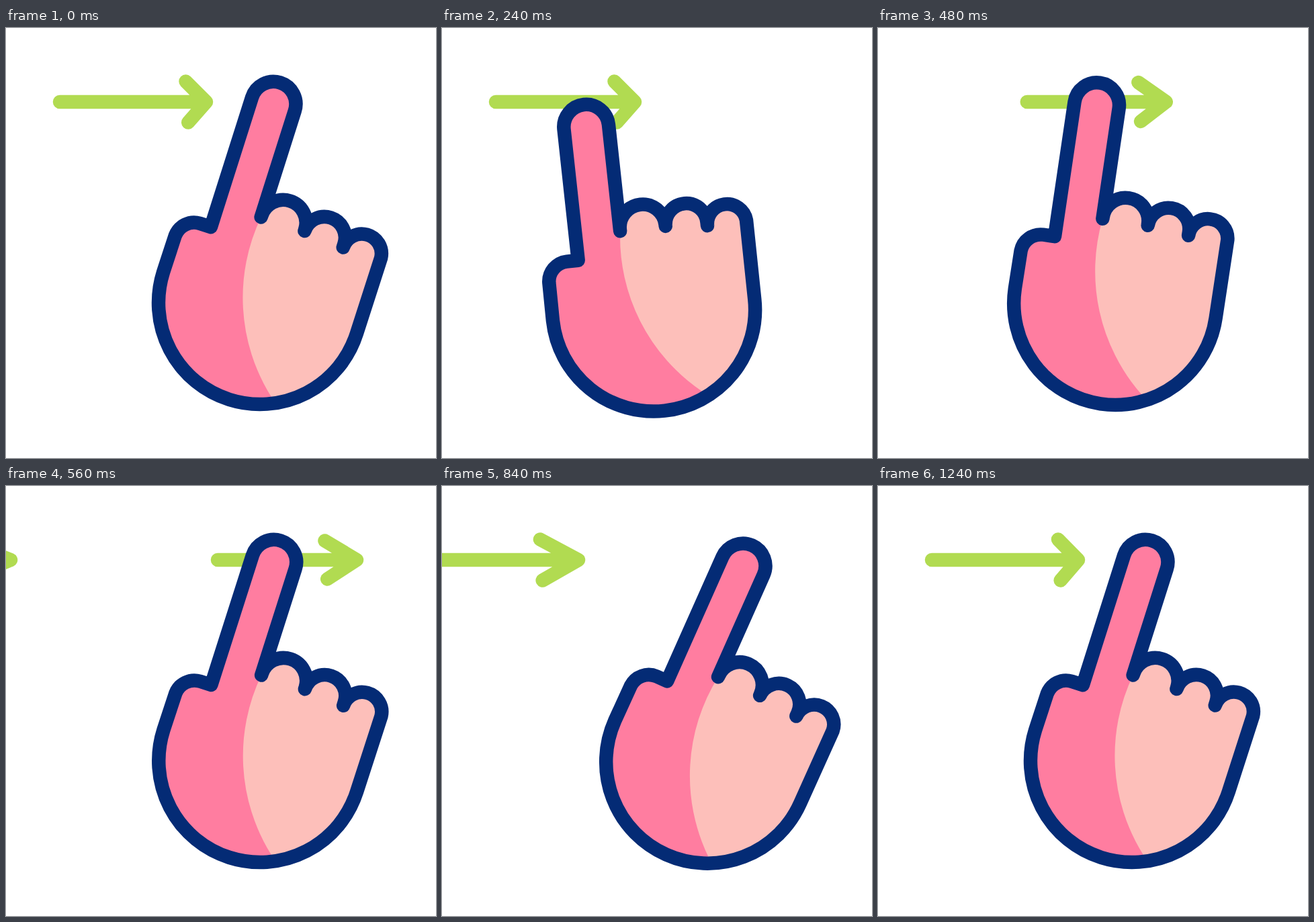
An HTML page for the animation above (1480 ms loop, 640x640 px).

```html
<!DOCTYPE html>
<html>
<head>
<meta charset="utf-8">
<title>Swipe right</title>
<style>
  html, body { margin: 0; width: 100%; height: 100%; overflow: hidden; background: #fff; }
  svg { display: block; width: 100%; height: 100%; }
  path { fill: none; stroke-width: 20.5; stroke-linecap: round; stroke-linejoin: round; }
  .arrow { stroke: #b1db51; }
  #line { stroke: #042b75; }
  #skin { fill: #ff7da0; }
  #light { fill: #fdbfba; }
</style>
</head>
<body>
<svg viewBox="0 0 640 640">
  <path class="arrow" id="leaving"/>
  <path class="arrow" id="entering"/>
  <g id="hand">
    <path id="skin"/>
    <path id="light"/>
    <path id="line"/>
  </g>
</svg>
<script>
const LOOP = 1480, STEP = 40, REST = 17.6, LENGTH = 207;
const el = id => document.getElementById(id);
const setPath = (id, d) => el(id).setAttribute('d', d);
const clamp = x => Math.min(1, Math.max(0, x));

// Smooth monotone curve through [time, value] keys, flat at both ends.
function track(...keys) {
  const n = keys.length - 1;
  const rate = i => (keys[i + 1][1] - keys[i][1]) / (keys[i + 1][0] - keys[i][0]);
  const slope = i => {
    if (i === 0 || i === n) return 0;
    const a = rate(i - 1), b = rate(i);
    return a * b > 0 ? 2 * a * b / (a + b) : 0;
  };
  return t => {
    if (t <= keys[0][0]) return keys[0][1];
    if (t >= keys[n][0]) return keys[n][1];
    const i = keys.findIndex(k => k[0] > t) - 1;
    const [t0, v0] = keys[i], [t1, v1] = keys[i + 1];
    const d = t1 - t0, u = (t - t0) / d, w = 1 - u;
    return v0 * w * w * (1 + 2 * u) + v1 * u * u * (3 - 2 * u)
      + d * u * w * (slope(i) * w - slope(i + 1) * u);
  };
}

const angle = track([80, REST], [240, -6.2], [400, 0.7], [560, 17.7], [680, 29.4], [840, 24], [1200, REST]);
const enter = track([440, -80], [560, 7], [680, 87], [840, 203], [1100, 300], [1240, 298]);

function arrow(tail, tip, w, h) {
  return `M${tail} 110H${tip}M${tip - w} ${110 - h}L${tip} 110L${tip - w + 3.7} ${110 + h}`;
}

// The arrow shortens, then speeds off to the right while its head stretches.
function leaving(t) {
  const v = Math.max(0, t - 240) / 160;
  const tail = 80 + 82.4 * v + 2.7 * v ** 4.7;
  const extra = 11 * clamp((240 - t) / 160);
  return arrow(tail, tail + LENGTH + extra, 30.5 + 3.5 * v + 2.5 * v * v, 30.5 - v);
}

// Its successor slides in from the left and the head relaxes.
function entering(t) {
  const tip = enter(t);
  return arrow(Math.min(80, tip - LENGTH), tip, 30 + 46 * clamp((1240 - t) / 680), 30.5);
}

// Hand geometry: origin at the palm centre, finger pointing up.
const knuckles = 'M-37 -122V-124A34 34 0 0 1 31 -124V-122A31 31 0 0 1 93 -121'
  + 'V-116A29.3 29.3 0 0 1 151.5 -118L151 0';

function outline(top) {
  return knuckles + 'A151 151 0 0 1 -151 0L-150.5 -57A30 30 0 0 1 -121 -85.5H-103.8'
    + `V${top}A33.4 33.4 0 0 1 -37 ${top}Z`;
}

setPath('light', knuckles + 'A151 151 0 0 1 66 136L58 128A278 278 0 0 1 -37 -122Z');

function draw(now) {
  const t = Math.floor(now % LOOP / STEP) * STEP;
  setPath('leaving', t < 760 ? leaving(t) : '');
  setPath('entering', t > 440 ? entering(t) : '');

  const press = 6.5 * clamp(1 - Math.abs(t - 240) / 120);
  const hand = outline(press - 288);
  setPath('skin', hand);
  setPath('line', hand);
  el('hand').setAttribute('transform',
    `rotate(${angle(t) - REST} 371.5 563.5) translate(378 409) rotate(${REST})`);
  requestAnimationFrame(draw);
}
requestAnimationFrame(draw);
</script>
</body>
</html>
```
